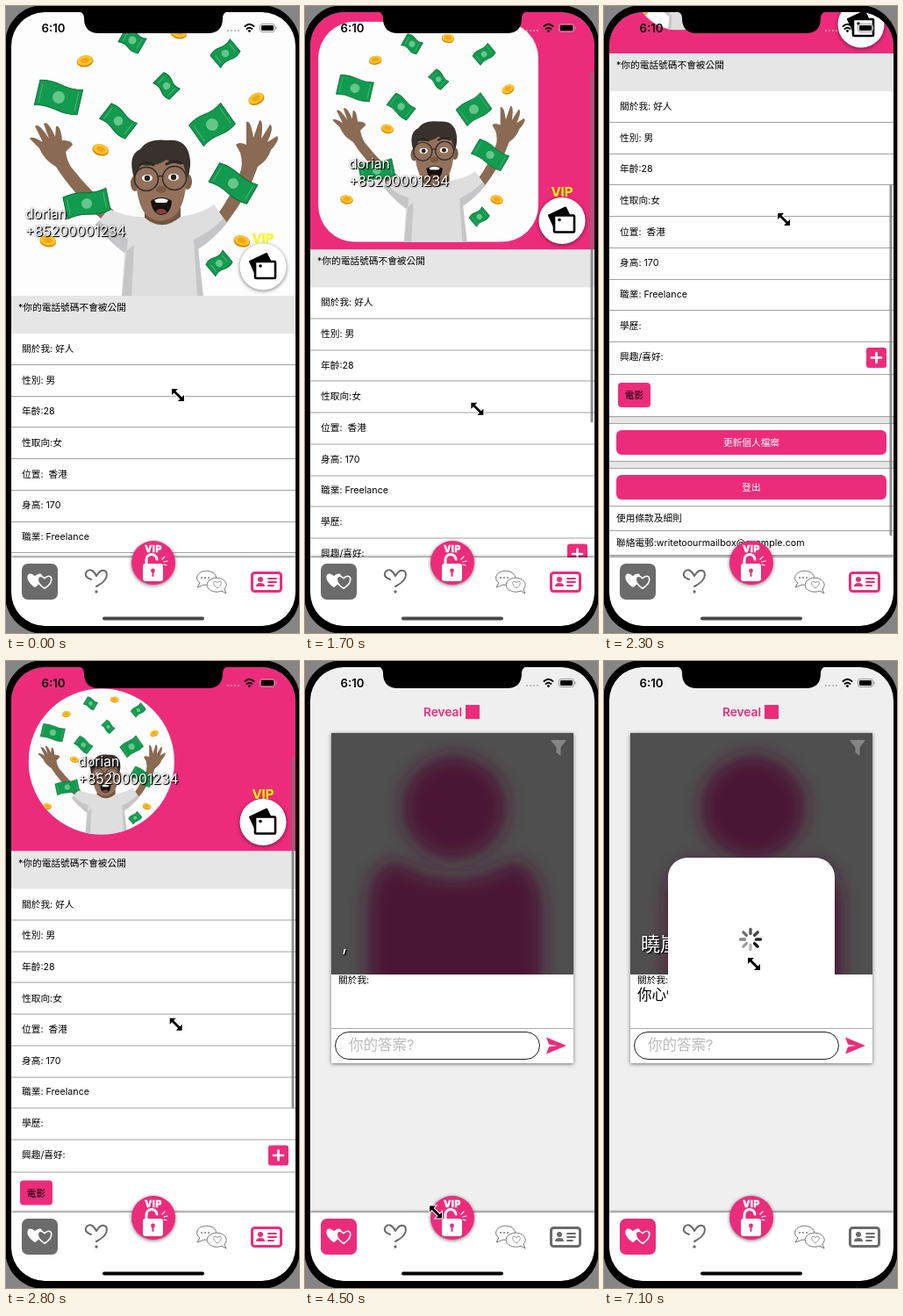
Animation, 334 px wide and 714 px high, one loop 7200 ms. Source, as an HTML page:

```html
<!DOCTYPE html>
<html lang="zh-Hant">
<head>
<meta charset="utf-8">
<style>
html, body { margin: 0; width: 100%; height: 100%; overflow: hidden; background: #858585; }
svg { display: block; font: 10.7px Inter, "Noto Sans CJK TC", "Noto Sans CJK", sans-serif; }
.shade { fill: #fff; filter: drop-shadow(1px 1px 0 #000) drop-shadow(0 0 1px #0008); }
.soft { filter: drop-shadow(0 1px 2px #0008); }
</style>
</head>
<body>
<svg id="stage" width="334" height="714" viewBox="0 0 334 714"></svg>
<script>
const PINK = '#ec2c7b', SKIN = '#8a6a52', LOOP = 7200;
const SCREEN = 'M44 7H292A38 38 0 0 1 330 45V668A38 38 0 0 1 292 706H44A38 38 0 0 1 6 668V45A38 38 0 0 1 44 7Z';

const rect = (x, y, w, h, fill, rx = 0, more = '') =>
  `<rect x="${x}" y="${y}" width="${w}" height="${h}" fill="${fill}" rx="${rx}" ${more}/>`;
const text = (x, y, str, more = '') => `<text x="${x}" y="${y}" ${more}>${str}</text>`;
const path = (d, fill = 'none', more = '') => `<path d="${d}" fill="${fill}" ${more}/>`;
const line = (d, color, width) =>
  path(d, 'none', `stroke="${color}" stroke-width="${width}" stroke-linecap="round" stroke-linejoin="round"`);
const rule = y => rect(6, y, 324, 1, '#a2a2a2');
const heart = (x, y, size, more) =>
  `<path transform="translate(${x} ${y}) scale(${size})" d="M0 5C-9-1-5-8 0-3C5-8 9-1 0 5Z" ${more}/>`;

const bill = ([x, y, w, h, angle]) => {
  const a = w / 2, b = h / 2;
  return `<g transform="translate(${x} ${y}) rotate(${angle})">` +
    path(`M${-a} ${-b}Q${-a / 2} ${-b - 3} 0 ${-b}T${a} ${-b}V${b}Q${a / 2} ${b + 3} 0 ${b}T${-a} ${b}Z`,
      '#129a4e', 'stroke="#087038"') +
    `<circle r="${h * .24}" fill="#67c58b"/>` +
    line(`M${-a + 4} ${-b + 4}V${b - 4}M${a - 4} ${-b + 4}V${b - 4}`, '#49b576', 1) + '</g>';
};
const coin = ([x, y, angle]) => `<g transform="translate(${x} ${y}) rotate(${angle})">
  <ellipse cy="1" rx="9.5" ry="6.5" fill="#d98a09"/><ellipse rx="9" ry="5.5" fill="#fcc42c"/>
  <ellipse rx="5" ry="3" fill="#f2a816"/></g>`;

const arms =
  path('M111 245Q76 213 57 183Q43 175 38 162L27 151Q29 147 42 155L33 137Q37 132 49 151L43 134Q48 130 56 149L57 137Q62 135 64 153Q75 153 76 158L68 166Q70 180 78 188Q96 211 123 233Z', SKIN) +
  path('M237 243Q259 214 268 186Q270 177 267 167L262 158Q266 154 274 158L274 132Q279 129 282 150L289 130Q294 130 291 151L301 135Q306 137 298 155L309 148Q313 152 302 164Q298 176 287 183Q276 216 249 250Z', SKIN);
const shirt =
  path('M102 249L117 231Q140 241 157 240H199Q224 236 237 226L252 247Q235 267 219 277L225 331H132L135 281Q115 266 102 249Z', '#dedede') +
  path('M102 249L106 244Q118 259 139 265L132 331H143L146 272L135 281Q115 266 102 249ZM252 247L248 242Q232 258 214 266L218 331H225L219 277Q235 267 252 247Z', '#c6c6c8') +
  path('M158 232V241Q178 258 199 240V230Z', '#735641');
const head =
  `<ellipse cx="147" cy="202" rx="5" ry="9" fill="#80604a"/><ellipse cx="207" cy="200" rx="5" ry="9" fill="#80604a"/>` +
  path('M148 182Q147 226 161 239Q177 251 193 238Q207 224 206 180Q178 156 148 182Z', '#93715a') +
  path('M146 196Q138 170 153 163Q161 150 184 153Q205 151 209 170Q212 181 207 196L202 180Q190 180 183 175Q170 184 154 181Z', '#38312e') +
  line('M152 181Q160 176 168 181M183 180Q191 175 199 179', '#2c2421', 3) +
  '<ellipse cx="161" cy="196" rx="6" ry="4" fill="#fff"/><ellipse cx="191" cy="195" rx="6" ry="4" fill="#fff"/>' +
  '<circle cx="161" cy="196" r="3.2" fill="#25201e"/><circle cx="191" cy="195" r="3.2" fill="#25201e"/>' +
  '<g fill="none" stroke="#2b2b2b" stroke-width="1.5"><circle cx="160" cy="197" r="13.5"/><circle cx="192" cy="196" r="13.5"/><path d="M173 195Q176 192 179 195"/></g>' +
  '<ellipse cx="177" cy="209" rx="6" ry="4" fill="#795943"/>' +
  path('M165 222Q177 214 189 222Q188 237 177 238Q167 237 165 222Z', '#161010') +
  path('M169 221Q177 217 185 221L183 224H171Z', '#fff') +
  '<ellipse cx="177" cy="234" rx="6" ry="3" fill="#8a3d3d"/>';
const photo = rect(6, 6, 324, 324, '#fdfdfd') +
  [[60, 104, 50, 29, 13], [144, 39, 26, 19, 30], [250, 54, 29, 18, -40], [183, 91, 26, 17, 45], [128, 131, 37, 22, 38],
   [235, 135, 44, 29, -35]].map(bill).join('') +
  [[90, 62, -10], [197, 30, 10], [285, 105, -25], [108, 163, 15], [48, 267, 10], [269, 267, 15]].map(coin).join('') +
  arms + shirt + head + [[259, 202, 50, 25, 30], [92, 225, 50, 25, -12], [243, 293, 25, 17, -40]].map(bill).join('');

const rows = ['關於我: 好人', '性別: 男', '年齡:28', '性取向:女', '位置:&#160; 香港', '身高: 170', '職業: Freelance', '學歷:', '興趣/喜好:'];
const button = (y, label) => rect(14, y, 308, 28, PINK, 6) + text(168, y + 18, label, 'fill="#fff" text-anchor="middle"');
const profile = `
  ${rect(6, 6, 324, 324, PINK)}
  <g id="photo" clip-path="url(#round)">${photo}</g>
  <g id="owner" class="shade" font-size="15.7">${text(22, 242, 'dorian')}${text(22, 262, '+85200001234')}</g>
  ${text(293, 270, 'VIP', 'fill="#ff0" font-size="15" font-weight="700" text-anchor="middle" style="filter:drop-shadow(.5px .5px 0 #7777)"')}
  <circle class="soft" cx="293" cy="297" r="26.5" fill="#fff"/>
  ${path('M278 291L297 282L301 290H284V304Z', '#000', 'stroke="#000" stroke-width="2" stroke-linejoin="round"')}
  ${rect(284, 291, 23, 19, '#fff', 1, 'stroke="#000" stroke-width="2.6"')}
  ${path('M286 307L291 299L295 303L300 297L305 307Z')}<circle cx="290" cy="296" r="1.8"/>
  ${rect(6, 330, 324, 43, '#e6e6e6')}${text(14, 347, '*你的電話號碼不會被公開')}
  ${rows.map((label, i) => text(18, 394 + i * 35.66, label) + rule(i < 8 ? Math.round(408 + i * 35.7) : 695)).join('')}
  ${rect(299, 665, 23, 23, PINK, 3)}${line('M305 676.500H316M310.500 671V682', '#fff', 2.6)}
  ${rect(16, 705, 37, 28, PINK, 4)}${text(34.5, 723, '電影', 'text-anchor="middle"')}
  ${rect(6, 744, 324, 7, '#e6e6e6')}${rule(743)}${rule(751)}${button(759, '更新個人檔案')}
  ${rect(6, 795, 324, 7, '#e6e6e6')}${rule(794)}${rule(802)}${button(810, '登出')}${rule(845)}
  ${text(14, 863, '使用條款及細則')}${rule(873)}${text(14, 891, '聯絡電郵:writetoourmailbox@example.com')}${rule(901)}`;

const answer = `
  ${rect(6, 6, 324, 624, '#efefef')}
  ${text(179, 62.5, 'Reveal', `fill="${PINK}" font-size="13.7" font-weight="600" text-anchor="end"`)}${rect(183, 50, 16, 16, PINK)}
  ${rect(30, 82, 276, 376, '#fff', 1, 'class="soft"')}
  <g clip-path="url(#card)">${rect(30, 82, 276, 275, '#4f4f4f')}
    <g fill="#4b1435" filter="url(#blur)"><circle cx="170" cy="167" r="59"/>
    <path d="M72 380V275Q76 230 105 228Q170 270 235 228Q264 230 270 275V380Z"/></g></g>
  ${path('M280 90H298L291.500 98.500V108L286.500 104V98.500Z', '#858585')}
  <text id="person" class="shade" x="42" y="330" font-size="22"></text>
  ${text(38, 367, '關於我:')}<text id="about" x="38" y="385.500" font-size="16.5"></text>
  ${rect(30, 418, 276, 1, '#aaa')}${rect(34.5, 422.5, 233, 31, '#fff', 15.5, 'stroke="#222"')}
  ${text(50, 443, '你的答案?', 'fill="#bbb" font-size="16.5"')}
  ${path('M275 428.500L298 438L275 447.500L278 439.500L287 438L278 436.500Z', PINK)}
  <g id="loader">${rect(73, 224, 190, 188, '#fff', 22)}<g id="spokes">
    ${[...Array(8).keys()].map(i => `<path d="M167 310.500V305.500" transform="rotate(${i * 45} 167 317)" stroke="#111" stroke-width="3.4" stroke-linecap="round"/>`).join('')}
  </g></g>`;

const tabs = `
  ${rect(6, 628, 324, 80, '#fff', 0, 'style="filter:drop-shadow(0 -1px 1.5px #0009)"')}
  <g id="homeTab">${rect(18, 635, 41, 41, 'currentColor', 7)}
    ${heart(33, 654, 1.6, 'fill="#fff"')}${heart(44, 656, 1.45, 'fill="currentColor" stroke="#fff" stroke-width="1.1"')}</g>
  ${line('M97 653Q88 650 92 644Q98 639 103 649Q108 640 114 644Q118 653 103 661', '#6a6a6a', 2)}<circle cx="103" cy="667" r="1.7" fill="#6a6a6a"/>
  <circle class="soft" cx="168" cy="634" r="25" fill="${PINK}"/>
  ${text(168, 622, 'VIP', 'fill="#fff" stroke="#fff" stroke-width=".6" font-size="10.5" font-weight="800" letter-spacing=".6" text-anchor="middle"')}
  ${rect(156, 635, 23, 20, '#fff', 3)}${line('M160 635V631A6 6 0 0 1 172 630', '#fff', 3)}
  <circle cx="167.500" cy="643" r="2.4" fill="${PINK}"/>${line('M167.500 644V649', PINK, 2)}
  ${line('M178 630L181 627M180 633L184 632M180 636L183 637', '#fff', 1.2)}
  <g fill="#fff" stroke="#777"><path d="M221 657L218 662L226 659A11 8 0 1 0 221 657Z"/>
    <path d="M246 666L251 669L249 664A11 8 0 1 0 246 666Z"/>${heart(241, 659, .8, '')}</g>
  ${line('M223 651H223.100M227 651H227.100M231 651H231.100', '#777', 1.8)}
  <g id="cardTab">${rect(280.5, 645.5, 33, 21, '#fff', 3, 'stroke="currentColor" stroke-width="3"')}
    <circle cx="290" cy="653" r="3" fill="currentColor"/>${path('M285 661Q285 657 290 657T295 661Z', 'currentColor')}
    ${line('M299 652H308M299 656H308M299 660H305', 'currentColor', 1.8)}</g>`;

const chrome = `
  ${text(54, 30, '6:10', 'font-size="13.2" font-weight="600" text-anchor="middle"')}
  ${line('M253 28H253.100M257 28H257.100M261 28H261.100M265 28H265.100', '#aaa', 2)}
  ${line('M272.500 23Q277.500 18.500 282.500 23M274.500 26Q277.500 23.500 280.500 26', '#000', 1.9)}<circle cx="277.500" cy="28.500" r="1.4"/>
  ${rect(289.5, 20.5, 17, 9, 'none', 2.5, 'stroke="#999"')}${rect(291, 22, 14, 6, '#000', 1.2)}${rect(307.5, 23.5, 1.2, 3, '#999')}
  <rect id="homeBar" x="110" y="695.500" width="116" height="4" rx="2"/>
  ${path('M43-1H291A44 44 0 0 1 335 43V671A44 44 0 0 1 291 715H43A44 44 0 0 1-1 671V43A44 44 0 0 1 43-1Z' + SCREEN, '#000', 'fill-rule="evenodd"')}
  ${path('M82 6Q89 7 89 14Q89 31 106 31H230Q247 31 247 14Q247 7 254 6Z', '#000')}
  <path id="cursor" d="M-7-7H0L-2.500-4.500L4.500 2.500L7 0V7H0L2.500 4.500L-4.500-2.500L-7 0Z" stroke="#fff" stroke-width="2" paint-order="stroke"/>`;

const $ = id => document.getElementById(id);
$('stage').innerHTML = `<defs>
  <clipPath id="screen"><path d="${SCREEN}"/></clipPath>
  <clipPath id="round"><rect id="corner" x="6" y="6" width="324" height="324"/></clipPath>
  <clipPath id="card"><rect x="30" y="82" width="276" height="275"/></clipPath>
  <filter id="blur" x="-30%" y="-30%" width="160%" height="160%"><feGaussianBlur stdDeviation="10"/></filter></defs>
  <g clip-path="url(#screen)">${rect(0, 0, 334, 714, '#fff')}
  <g id="profile"><g id="scroller">${profile}</g><rect id="bar" x="325.500" width="3" height="400" rx="1.500" fill="#777" opacity=".8"/></g>
  <g id="answer">${answer}</g>${tabs}</g>${chrome}`;

const SCROLL = [[0, 0], [1600, 0], [1900, 156], [2300, 276], [2500, 276], [2900, 60], [3200, 22], [3400, 17], [3600, 16]];
const POINTER = [[0, 196, 443], [1000, 192, 460], [1600, 194, 510], [1900, 201, 358], [2300, 205, 243], [2500, 205, 243],
  [2900, 190, 470], [3400, 14, 649], [3800, 36, 656], [4200, 38, 656], [4500, 149, 628], [5100, 171, 345]];

// Linear interpolation along [time, ...values] keys.
function track(keys, t) {
  const i = keys.findIndex(k => k[0] > t);
  if (i < 0) return keys[keys.length - 1].slice(1);
  const [a, b] = [keys[i - 1], keys[i]], p = (t - a[0]) / (b[0] - a[0]);
  return a.slice(1).map((v, j) => v + (b[j + 1] - v) * p);
}
const move = (id, ...xy) => $(id).setAttribute('transform', `translate(${xy})`);
const show = (id, on) => $(id).style.display = on ? '' : 'none';

function draw(t) {
  const [s] = track(SCROLL, t), fold = Math.min(s, 160);
  const size = 324 - 1.39 * fold, k = size / 324;
  const onAnswer = t >= 4200, loaded = t >= 5300;
  move('scroller', 0, -s);
  $('photo').setAttribute('transform', `translate(${6 + .173 * fold} ${330 - .167 * fold - size}) scale(${k}) translate(-6 -6)`);
  $('corner').setAttribute('rx', Math.min(162, s * .8 / k));
  move('owner', .532 * fold, -.077 * fold);
  $('bar').setAttribute('y', 44 + .578 * s);
  show('bar', t > 1600);
  show('profile', !onAnswer);
  show('answer', onAnswer);
  $('homeTab').style.color = onAnswer ? PINK : '#6b6b6b';
  $('cardTab').style.color = onAnswer ? '#6b6b6b' : PINK;
  $('homeBar').setAttribute('fill', t < 2800 ? '#4a4a4a' : '#000');
  $('person').textContent = loaded ? '曉嵐, 24' : ',';
  $('about').textContent = loaded ? '你心情如何' : '';
  show('loader', t >= 5000);
  const lead = Math.floor(t / 125) + 3;
  [...$('spokes').children].forEach((spoke, i) =>
    spoke.setAttribute('opacity', 1 - ((lead - i) % 8) * .1));
  move('cursor', ...track(POINTER, t));
}

const start = performance.now();
(function frame() {
  draw((performance.now() - start) % LOOP);
  requestAnimationFrame(frame);
})();
</script>
</body>
</html>
```
